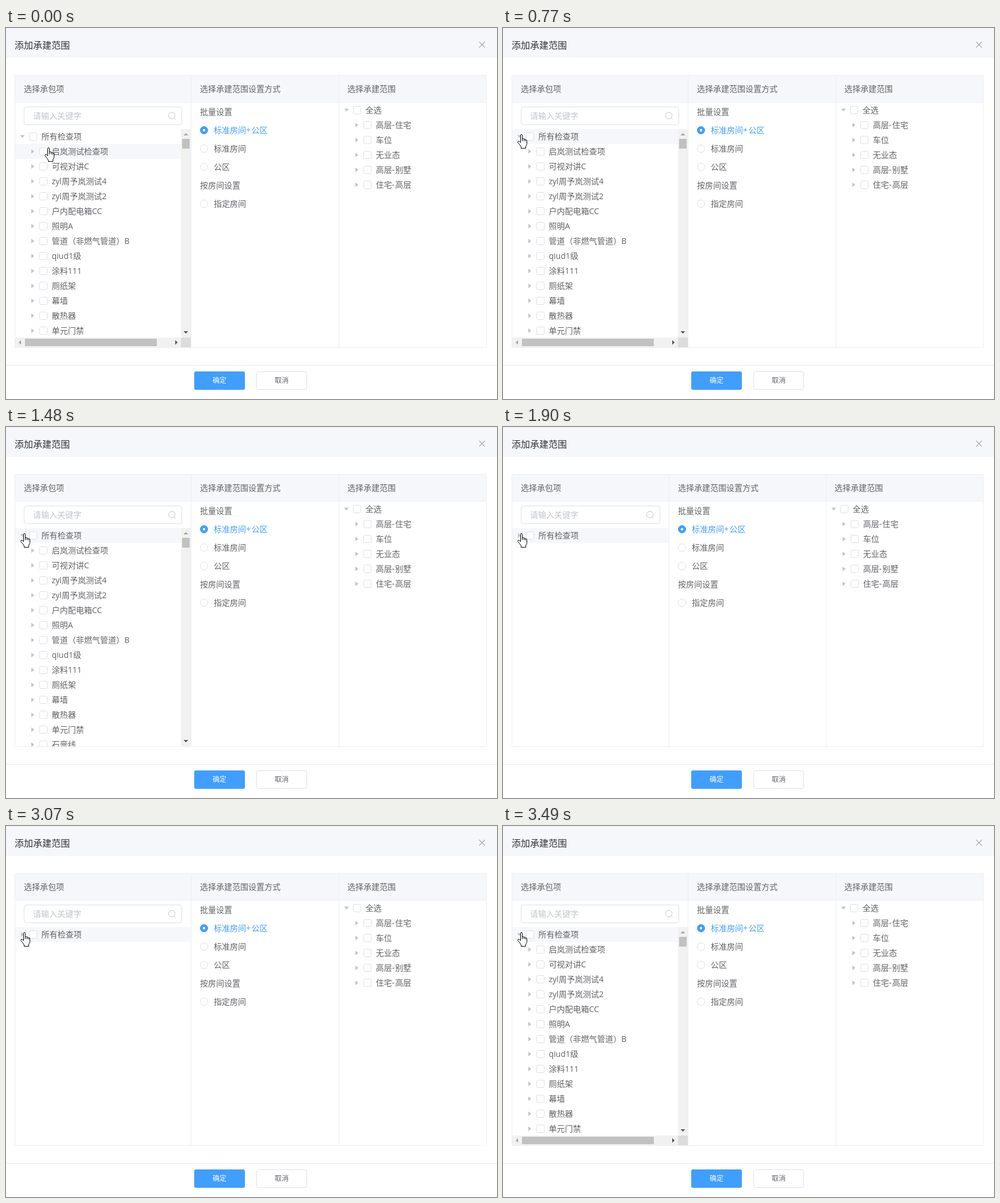
An HTML page for the animation above (3.67 s loop, 853x646 px).

```html
<!DOCTYPE html>
<html lang="zh">
<head>
<meta charset="utf-8">
<title>添加承建范围</title>
<style>
html, body { margin: 0; width: 100%; height: 100%; overflow: hidden; background: #fff; }
svg { display: block; }
text { font: 14px "Open Sans", "Noto Sans CJK SC", "Noto Sans CJK", sans-serif; fill: #606266; white-space: pre; }
</style>
</head>
<body>
<svg id="stage" width="853" height="646" viewBox="0 0 853 646"></svg>
<script>
const LOOP = 3670, FULL = 8000, ROW = 26, TOP = 176, BOTTOM = 556;
const BLUE = '#409eff', LINE = '#ebeef5', EDGE = '#dcdfe6', PALE = '#f5f7fb', MUTED = '#c0c4cc';
const stage = document.getElementById('stage');

function add(parent, tag, attrs, content) {
  const node = document.createElementNS('http://www.w3.org/2000/svg', tag);
  set(node, attrs);
  if (content) node.textContent = content;
  parent.appendChild(node);
  return node;
}
function set(node, attrs) {
  for (const key in attrs) node.setAttribute(key, attrs[key]);
}
const show = (node, on) => set(node, { visibility: on ? 'visible' : 'hidden' });
const group = (parent = stage) => add(parent, 'g', {});
const move = (node, x, y = 0) => set(node, { transform: `translate(${x} ${y})` });
const rect = (p, x, y, width, height, fill, more) =>
  add(p, 'rect', { x, y, width, height, fill, ...more });
const box = (p, x, y, w, h, rx) =>
  rect(p, x + .5, y + .5, w - 1, h - 1, '#fff', { stroke: EDGE, rx });
const path = (p, d, more) => add(p, 'path', { d, fill: 'none', ...more });

// Text is placed by its vertical centre; signs get a little room after them.
function label(p, x, cy, string, color, size = 14, more) {
  const node = add(p, 'text', { x, y: cy + size * .37, ...more });
  node.style.fontSize = size + 'px';
  if (color) node.style.fill = color;
  let gap = 0;
  for (const part of string.split(/(?<=[+-])/)) {
    add(node, 'tspan', { dx: gap }, part);
    gap = part.endsWith('+') ? 1.6 : 1.1;
  }
  return node;
}
function caret(p, x, y, angle = 0, fill = MUTED) {
  return path(p, 'M-2.5 -4L2.5 0L-2.5 4Z', { fill, transform: `translate(${x} ${y}) rotate(${angle})` });
}
function treeRow(p, x, cy, name, expanded) {
  const arrow = caret(p, x, cy, expanded ? 90 : 0);
  box(p, x + 11.5, cy - 7, 14, 14, 2);
  label(p, x + 33, cy, name);
  return arrow;
}

// Page frame
rect(stage, 0, 0, 853, 52, PALE);
label(stage, 15, 30, '添加承建范围', '#303133', 16);
path(stage, 'M822 24L832 34M832 24L822 34', { stroke: '#a3a6ac', 'stroke-width': 1.1 });
rect(stage, 15, 83, 820, 46, PALE);
path(stage, 'M15 129.5H835M15.5 82.5H834.5V556.5H15.5Z', { stroke: LINE });
path(stage, 'M0 587.5H853', { stroke: '#e8eaee' });
rect(stage, 327, 598, 88, 32, BLUE, { rx: 3 });
label(stage, 371, 614, '确定', '#fff', 12, { 'text-anchor': 'middle', 'font-weight': 500 });
box(stage, 435, 598, 88, 32, 3);
label(stage, 479, 614, '取消', '', 12, { 'text-anchor': 'middle' });

// Left column
label(stage, 31, 106, '选择承包项');
const hover = rect(stage, 16, TOP, 288, ROW, PALE);
const field = box(stage, 31, 137, 275, 32, 4);
label(stage, 47, 153, '请输入关键字', MUTED);
const lens = group();
add(lens, 'circle', { cx: 288, cy: 152.5, r: 5.6, fill: 'none', stroke: MUTED });
path(lens, 'M292 156.5L294.8 159', { stroke: MUTED });
const rootArrow = treeRow(stage, 28.5, 189, '所有检查项');

const clip = add(add(stage, 'clipPath', { id: 'list' }), 'rect', { x: 16, y: 202, width: 288, height: 354 });
const list = add(stage, 'g', { 'clip-path': 'url(#list)' });
['启岚测试检查项', '可视对讲C', 'zyl周予岚测试4', 'zyl周予岚测试2', '户内配电箱CC', '照明A',
  '管道（非燃气管道）B', 'qiud1级', '涂料111', '厕纸架', '幕墙', '散热器', '单元门禁', '石膏线']
  .forEach((name, i) => treeRow(list, 46.5, 215 + ROW * i, name));

// Scroll bars
const vBar = group();
const vTrack = rect(vBar, 304, TOP, 17, 380, '#f1f1f1');
const vThumb = rect(vBar, 306, 193, 13, 17, '#c1c1c1');
path(vBar, 'M308.5 187L312.5 183L316.5 187Z', { fill: '#a3a3a3' });
const downArrow = path(vBar, 'M308.5 -2L312.5 2L316.5 -2Z', { fill: '#505050' });
const hBar = group();
rect(hBar, 16, 539, 288, 17, '#f1f1f1');
rect(hBar, 33, 541, 229, 13, '#c1c1c1');
rect(hBar, 304, 539, 17, 17, '#dcdcdc');
path(hBar, 'M26 543.5L22 547.5L26 551.5Z', { fill: '#a3a3a3' });
path(hBar, 'M294 543.5L298 547.5L294 551.5Z', { fill: '#505050' });

// Middle column
const middle = group();
path(middle, 'M321.5 83V556', { stroke: LINE });
label(middle, 337, 106, '选择承建范围设置方式');
label(middle, 337, 146, '批量设置');
label(middle, 337, 274, '按房间设置');
[['标准房间+公区', 178, true], ['标准房间', 210], ['公区', 242], ['指定房间', 306]].forEach(([name, y, on]) => {
  add(middle, 'circle', { cx: 344, cy: y, r: 6.5, fill: on ? BLUE : '#fff', stroke: on ? BLUE : EDGE });
  if (on) add(middle, 'circle', { cx: 344, cy: y, r: 2.2, fill: '#fff' });
  label(middle, 361, y, name, on && BLUE);
});

// Right column
const right = group();
path(right, 'M578.5 83V556', { stroke: LINE });
label(right, 593, 106, '选择承建范围');
treeRow(right, 591.5, 143, '全选', true);
['高层-住宅', '车位', '无业态', '高层-别墅', '住宅-高层']
  .forEach((name, i) => treeRow(right, 609.5, 169 + ROW * i, name));

// Pointer
const flash = add(stage, 'circle', { cx: 30, cy: 186, r: 12, fill: '#ff0', opacity: .55 });
const hand = group();
path(hand, 'M5.5 14V2.2Q5.5 .5 7 .5T8.5 2.2V8Q10 6.6 11.5 8.5Q13.2 7.6 14 9.5Q16.5 9 16.5 12V16.5Q16.5 18.5 14.5 21V24.5H6.5V22Q4 18 1 14.5Q.2 12.5 2 12Q3.5 12 5.5 14.5Z',
  { fill: '#fff', stroke: '#000', 'stroke-linejoin': 'round' });
path(hand, 'M8.5 8V12M11.5 8.5V12M14 9.5V12.5', { stroke: '#000' });

const clamp = v => Math.min(1, Math.max(0, v));
const ease = v => { v = clamp(v); return v * v * (3 - 2 * v); };
const within = (t, from, to) => t >= from && t < to;

// Pointer offsets from its resting place: time, x, y
const trail = [[30, 42, 23], [350, 2, -2], [490, 4, 0], [740, 4, 0], [770, 0, 0]];
function pointerAt(t) {
  if (t <= trail[0][0]) return trail[0].slice(1);
  for (let i = 1; i < trail.length; i++) {
    const [t0, x0, y0] = trail[i - 1], [t1, x1, y1] = trail[i];
    if (t < t1) {
      const k = ease((t - t0) / (t1 - t0));
      return [Math.round(x0 + (x1 - x0) * k), Math.round(y0 + (y1 - y0) * k)];
    }
  }
  return [0, 0];
}
function childHeight(t) {
  if (t < 1900) return FULL * (1 - ease((t - 1500) / 300));
  return t < 3070 ? 0 : FULL * ease((t - 3175) / 305);
}

function draw(t) {
  const wide = !within(t, 1900, 3070);
  const settled = !within(t, 1480, 3490);
  const height = childHeight(t);
  const content = ROW + height;
  const scrolls = content > BOTTOM - TOP;
  const bottom = settled ? 539 : BOTTOM;
  const [x, y] = pointerAt(t);

  move(hand, 25 + x, 185 + y);
  show(flash, within(t, 1150, 1230) || within(t, 2770, 2820));
  set(hover, { y: y > 16 ? 202 : TOP, width: !wide ? 272 : scrolls ? 288 : 305 });

  move(middle, wide ? 0 : -33);
  move(right, wide ? 0 : -17);
  move(lens, wide ? 0 : -33);
  set(field, { width: wide ? 274 : 241 });

  const turn = t < 1900 ? 1 - ease((t - 1480) / 300) : ease((t - 3070) / 300);
  set(rootArrow, { transform: `translate(28.5 189) rotate(${90 * turn})` });
  set(clip, { width: scrolls ? 288 : 305, height: Math.min(height, bottom - 202) });

  show(vBar, scrolls);
  show(hBar, settled);
  set(vTrack, { height: bottom - TOP });
  set(vThumb, { height: Math.max(17, Math.round(346 * 380 / content)) });
  move(downArrow, 0, bottom - 9);
}

const start = performance.now();
function tick() {
  draw((performance.now() - start) % LOOP);
  requestAnimationFrame(tick);
}
draw(0);
requestAnimationFrame(tick);
</script>
</body>
</html>
```
